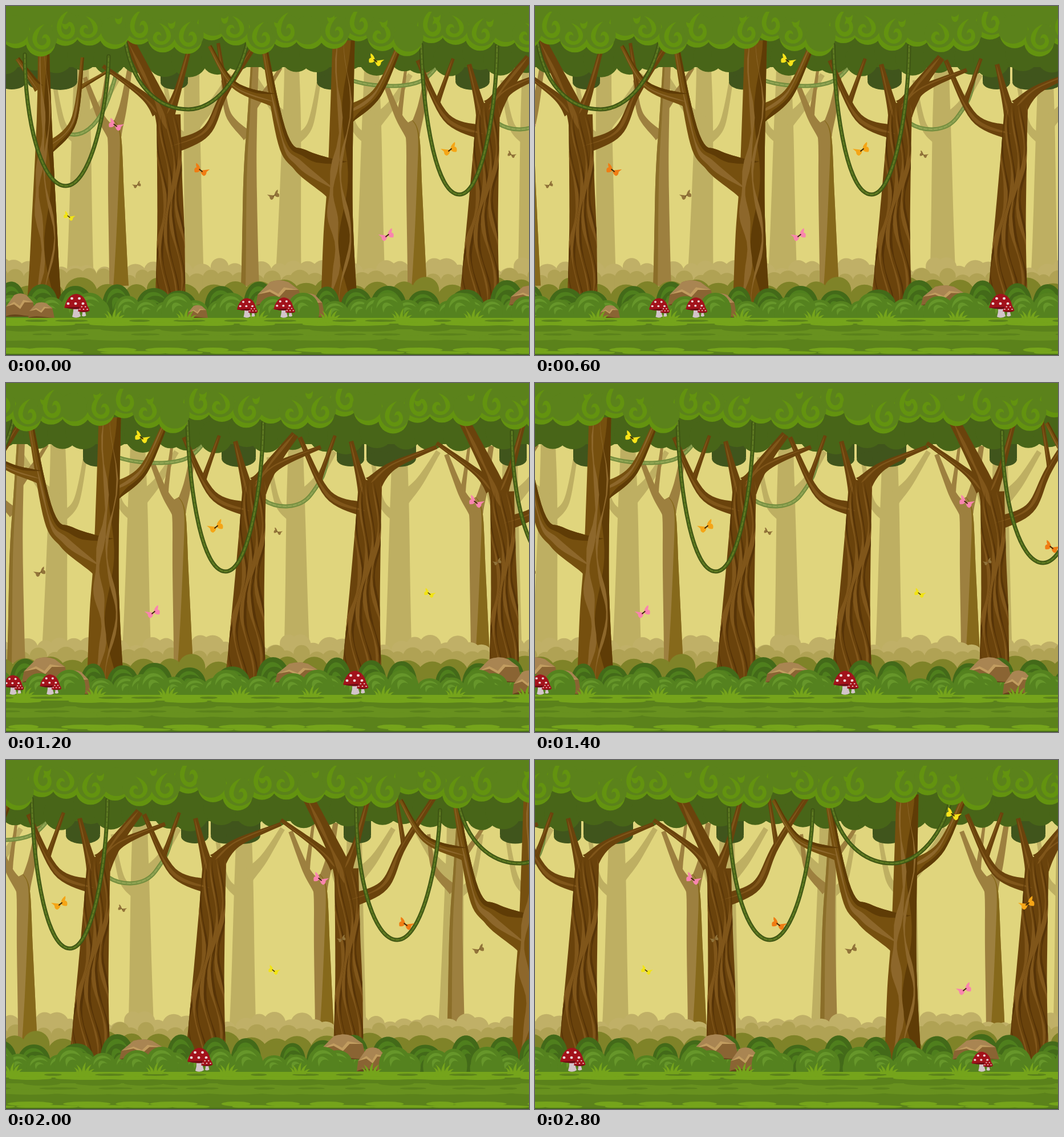
Animation, 917 px wide and 611 px high, one loop 3000 ms. Source, as an HTML page:

```html
<!DOCTYPE html>
<html lang="en">
<head>
<meta charset="utf-8">
<title>Forest walk</title>
<style>
html, body { margin: 0; width: 100%; height: 100%; overflow: hidden; background: #e0d57d; }
svg { display: block; width: 1900px; height: 611px; will-change: transform; }
</style>
</head>
<body>
<svg id="world" viewBox="0 0 1900 611"></svg>
<script>
const WIDTH = 1900;
const world = document.getElementById('world');
let art = '';
let seed = 7;
const rnd = (a, b) => {
  seed = (seed * 16807) % 2147483647;
  return a + (b - a) * seed / 2147483647;
};
const add = s => { art += s; };
const path = (d, fill) => add(`<path d="${d}" fill="${fill}"/>`);
const line = (d, color, w, dash = 'none') =>
  add(`<path d="${d}" fill="none" stroke="${color}" stroke-width="${w}" stroke-linecap="round" stroke-dasharray="${dash}"/>`);
const oval = (x, y, rx, ry, fill) =>
  add(`<ellipse cx="${x}" cy="${y}" rx="${rx}" ry="${ry}" fill="${fill}"/>`);
const rect = (y, h, fill, x = 0, w = WIDTH) => add(`<rect x="${x}" y="${y}" width="${w}" height="${h}" fill="${fill}"/>`);
const at = (x, y, draw, scale = 1) => {
  add(`<g transform="translate(${x} ${y}) scale(${scale})">`);
  draw();
  add('</g>');
};
const copies = (shifts, draw) => shifts.forEach(dx => at(dx, 0, draw));
const scatter = (gap, draw) => {
  for (let x = 0; x < WIDTH; x += gap) draw(x + rnd(-0.2, 0.2) * gap);
};

// A limb reads "startWidth>endWidth x,y x,y ..." and tapers along a smooth spine.
function spine(spec) {
  const [widths, ...knots] = spec.split(' ');
  const [w0, w1] = widths.split('>').map(Number);
  const k = knots.map(p => p.split(',').map(Number));
  const n = (k.length - 1) * 10;
  return Array.from({ length: n + 1 }, (_, s) => {
    const i = Math.min(Math.floor(s / 10), k.length - 2);
    const t = s / 10 - i;
    const [a, b, c, d] = [k[i - 1] || k[i], k[i], k[i + 1], k[i + 2] || k[i + 1]];
    const [x, y] = b.map((_, j) => b[j] + 0.5 * t * (c[j] - a[j] +
      t * (2 * a[j] - 5 * b[j] + 4 * c[j] - d[j] + t * (3 * (b[j] - c[j]) + d[j] - a[j]))));
    return [x, y, w1 + (w0 - w1) * (1 - s / n) ** 1.7];
  });
}
function limb(spec, fill, lo = () => -0.5, hi = () => 0.5) {
  const pts = spine(spec);
  const side = f => pts.map(([x, y, w], i) => {
    const [p, q] = [pts[Math.max(0, i - 1)], pts[Math.min(pts.length - 1, i + 1)]];
    const len = Math.hypot(q[0] - p[0], q[1] - p[1]);
    const o = w * f(y, i / (pts.length - 1)) / len;
    return `${(x - (q[1] - p[1]) * o).toFixed(1)} ${(y + (q[0] - p[0]) * o).toFixed(1)}`;
  });
  path(`M${side(lo).join('L')}L${side(hi).reverse().join('L')}Z`, fill);
}
const clamp = v => Math.max(-0.5, Math.min(0.5, v));
function stripe(spec, color, centre, half, wave, phase) {
  const mid = y => centre + wave * Math.sin(y / 36 + phase);
  const w = (y, t) => half * Math.sin(Math.PI * t) * (0.8 + 0.4 * Math.sin(y / 15 + phase));
  limb(spec, color, (y, t) => clamp(mid(y) - w(y, t)), (y, t) => clamp(mid(y) + w(y, t)));
}
function grainTree([trunk, ...boughs]) {
  [...boughs, trunk].forEach(s => limb(s, '#6a430c'));
  boughs.forEach(s => stripe(s, '#80561a', -0.12, 0.17, 0.05, 1));
  for (let c = -0.4; c < 0.45; c += 0.2) {
    stripe(trunk, '#573407', c + 0.09, 0.05, 0.2, c * 4);
    stripe(trunk, '#80561a', c, 0.06, 0.2, c * 4);
  }
}
function smoothTree([trunk, ...boughs]) {
  [...boughs, trunk].forEach(s => limb(s, '#76500f'));
  boughs.forEach(s => {
    limb(s, '#5f3c06', (y, t) => 0.5 - 0.3 * Math.min(1, t * 4));
    stripe(s, '#8d672b', -0.15, 0.14, 0.1, 2);
  });
  limb(trunk, '#5f3c06', y => 0.16 + 0.16 * Math.sin(y / 38));
  stripe(trunk, '#8d672b', -0.18, 0.16, 0.14, 2);
  stripe(trunk, '#8d672b', 0.2, 0.07, 0.2, 3);
}

const treeA = ['62>20 67,525 67,350 67,200 66,75', '24>6 70,252 118,203 134,90', '8>5 131,142 182,112', '18>8 58,145 20,92'];
const treeB = ['54>42 288,525 289,400 287,300 285,190', '42>19 285,215 265,160 212,55', '26>7 267,185 240,156 170,105',
  '24>7 285,190 302,145 328,50', '26>9 287,248 350,220 385,150 450,48', '10>6 386,152 372,65'];
const treeC = ['66>39 584,525 583,400 586,290 592,60', '34>10 598,190 650,153 694,60',
  '74>10 582,305 520,272 484,228 448,45', '24>7 470,165 400,138 357,70'];
const treeD = ['74>41 830,525 834,410 841,270 846,170', '28>8 838,222 772,195 722,95', '10>6 757,167 784,92',
  '24>8 836,195 812,102', '34>7 850,178 885,145 962,112'];
const thickBough = '38>14 850,185 880,138 917,90';

const midLean = ['34>22 198,490 193,330 190,230 180,205', '24>8 188,225 165,192 138,125', '24>9 191,225 205,178 217,110', '10>5 167,190 178,110'];
const midStraight = ['32>14 428,490 428,300 432,190 436,105', '20>6 424,228 390,190 380,130', '14>6 432,180 458,145 482,108'];
const midTrees = () => {
  [0, 523].forEach(dx => at(dx, 0, () => {
    midLean.forEach(s => limb(s, '#9d803f'));
    limb(midLean[0], '#86691b', y => clamp(0.5 - (y - 190) / 380));
  }));
  midStraight.forEach(s => limb(s, '#9d803f'));
  limb(midStraight[0], '#8b6e29', undefined, () => -0.25);
};
function paleTree(x, base, lean, side) {
  const top = x + lean;
  const tone = '#beaf62';
  limb(`${base}>26 ${x},480 ${top},210 ${top},105`, tone);
  limb(`28>9 ${top + side * 4},205 ${top + side * 34},174 ${top + side * 68},120`, tone);
  limb(`20>7 ${top - side * 6},235 ${top - side * 32},208 ${top - side * 48},130`, tone);
}

function hedge(step, top, spread, r, fill) {
  for (let x = -10; x < WIDTH; x += step * rnd(0.75, 1.25)) {
    const y = top + rnd(0, spread);
    const w = r * rnd(0.8, 1.25);
    path(`M${x - w} 555V${y + w}A${w} ${w} 0 0 1 ${x + w} ${y + w}V555Z`, fill);
  }
}
function bush(x, top, w, [fill, glow]) {
  const h = 552 - top;
  at(x, top, () => {
    path('M-1 1C-1.4.4-.8 0 0 0S1.4.4 1 1Z', fill);
    path('M-.8.55C-.8.1.2-.05.7.35C.2.15-.45.2-.8.55Z', glow);
    path('M-.3.7C-.6.3 0 .25.4.5C.1.4-.2.45-.3.7Z', glow);
  }, `${w} ${h}`);
}
const DEEP = ['#436a19', '#4f7f1d'];
const LEAFY = ['#55821f', '#66962a'];
function rock(x, bottom, w, h) {
  at(x, bottom, () => {
    path('M-.5 0L-.46-.42-.28-.62-.2-.9Q0-1.04.2-.9L.42-.6.5 0Z', '#8a6433');
    path('M-.46-.42L-.2-.9Q0-1.04.2-.9L.42-.6.1-.68-.02-.45-.2-.6Z', '#a98552');
    path('M-.46-.42L-.2-.62-.02-.45.1-.7.42-.6.14-.6 0-.32-.2-.52Z', '#c29d60');
    path('M-.5 0Q-.3-.14 0-.08T.5 0Z', '#65451b');
  }, `${w} ${h}`);
}
function cap(x, y, s) {
  at(x, y, () => {
    path('M-4-3Q-3 10-6 19Q2 23 9 18Q5 8 6-3Z', '#d3c4ca');
    path('M-20 3Q-14-21 2-21Q17-19 21 1Q8 9-20 3Z', '#a3121b');
    path('M-20 3Q0 2 21 1Q8 9-20 3Z', '#6d0c14');
    for (let i = -2; i < 3; i++) oval(i * 6.5, i % 2 ? -13 : -4, 2.5, 2.2, '#ecd9da');
  }, s);
}
function mushrooms(x, s) {
  at(x, 546, () => {
    cap(-2, -21, 1);
    cap(12, -13, 0.5);
  }, s);
}
const BROWN = '#92743a';
function butterfly(x, y, color, s, flip) {
  at(x, y, () => {
    path('M2 1L-15-1Q-11 2-9 4Q-9 10-4 11Q1 9 2 1Z', color);
    path('M2 1Q3-9 10-13Q11-8 9-5Q15-4 13 4Q8 6 2 1Z', color);
    line('M-1 3L4-1', color === BROWN ? '#77592a' : '#3a2606', 2);
  }, `${flip ? -s : s} ${s}`);
}
function vine(d, tones) {
  line(d, tones[0], 7);
  line(d, tones[1], 4);
  line(d, tones[2], 2, '5 4');
}

// Far distance
rect(0, 611, '#e0d57d');
copies([0, 968], () => {
  paleTree(130, 48, 2, 1);
  paleTree(330, 34, -4, 1);
  paleTree(495, 46, 6, -1);
  paleTree(639, 52, 2, 1);
  paleTree(920, 46, -2, 1);
});
copies([1044], midTrees);
hedge(26, 440, 20, 17, '#c0b067');
hedge(24, 457, 14, 15, '#b0a254');
copies([0], midTrees);
const backTones = ['#6f8a3b', '#83994a', '#93a755'];
vine('M545 85C570 125 620 140 675 140S740 125 757 105', backTones);
vine('M105 222C135 235 160 205 172 180S190 130 195 112', backTones);
vine('M862 205C885 220 925 222 945 195S970 160 975 122', backTones);
hedge(44, 472, 18, 25, '#7f8328');

// Shaded leaves behind the trees
copies([0, 1004], () => [10, 65, 95, 295, 572, 818].forEach((x, i) => {
  const r = 24 + i % 3 * 3;
  rect(80, 60 - r / 3, '#40551c', x - r, 2 * r);
  oval(x, 142 - r / 3, r, r / 2, '#40551c');
}));
rect(0, 107, '#486518');
scatter(46, x => {
  const r = rnd(25, 33);
  oval(x, rnd(112, 125) - r, r, r, '#486518');
});

// Main trees and hanging vines
smoothTree(treeA);
copies([0, 995], () => grainTree(treeB));
copies([0, 1018], () => smoothTree(treeC));
copies([203], () => grainTree(treeD));
copies([0, 992], () => grainTree([...treeD, thickBough]));
const vineTones = ['#3c5212', '#4f6a1a', '#627d24'];
copies([0, 1264], () => {
  vine('M33 85C33 200 62 315 105 315S178 180 180 88', vineTones);
  vine('M210 65C225 150 275 181 320 181S410 130 424 60', vineTones);
});
vine('M728 68C732 200 755 330 795 330S860 180 861 70', vineTones);

// Sunlit canopy: scalloped lobes with a lit lower rim and curls
const LIT = '#63930f';
const LEAF = '#5b821b';
const curl = 'M10-50C-24-40-32-8-8 6C14 16 34-2 23-20C17-31 3-28 4-15C10-24 20-14 14-6C4 6-15-4-9-21C-6-33 0-42 10-50Z';
const lobes = Array.from({ length: 24 }, (_, i) => ({
  x: 18 + i * 42.8,
  y: 74 + 9 * Math.sin(i * 2.1) + 7 * Math.sin(i * 1.3),
  flip: i % 3 ? 1 : -1
}));
rect(0, 52, LEAF);
copies([0, 1028], () => {
  lobes.forEach(({ x, y }) => oval(x, y - 25, 26, 25, LIT));
  lobes.forEach(({ x, y, flip }) => oval(x + flip * 3, y - 33, 26, 25, LEAF));
  lobes.forEach(({ x, y, flip }, i) => i % 4 && at(x, y - 19, () => path(curl, LIT), `${flip * 0.66} ${0.65 + i % 3 * 0.1}`));
  for (let x = 98; x < 1028; x += 93) path(`M${x} ${17 + x % 17}q7 5 13-3q0 14-7 14q-6-2-6-11Z`, LIT);
});
rect(0, 10, LEAF);

// Undergrowth
rect(530, 25, DEEP[0]);
scatter(62, x => bush(x, rnd(479, 499), rnd(20, 29), DEEP));
scatter(41, x => bush(x, rnd(505, 519), 21, LEAFY));
[479, 923, 1274, 1730].forEach((x, i) => {
  rock(x, 524, 82, i % 2 ? 36 : 45);
  if (i % 2 === 0) rock(x + 52, 545, 56, 43);
  bush(x - 10, 508, 24, LEAFY);
});
scatter(137, x => bush(x, 502, 25, LEAFY));
rock(25, 544, 54, 42);
rock(62, 546, 46, 28);
rock(336, 546, 36, 23);

// Ground
const GRASS = '#75a41b';
rect(549, 62, LEAF);
rect(546, 10, GRASS);
rect(566, 15, '#68911f');
scatter(90, x => {
  oval(x, 557, rnd(30, 60), 3, GRASS);
  oval(x + 40, 551, rnd(14, 30), 2, LEAF);
  oval(x + 20, 566, rnd(30, 60), 4, LEAF);
  oval(x, 581, rnd(45, 80), 5, '#68911f');
  oval(x + 50, 575, rnd(15, 35), 2, LEAF);
  oval(x, 602, rnd(25, 48), 4, GRASS);
  oval(x + 30, 607, rnd(30, 60), 3, GRASS);
});
rect(609, 2, '#466a1a');
for (let x = 190; x < WIDTH; x += 126) {
  path(`M${x - 14} 550q2-7-4-12q8 3 9 9q-1-9-5-14q9 6 10 13q1-10 7-17q-2 10-1 16q4-9 11-12q-5 7-5 12q5-4 10-4q-6 4-7 9Z`, GRASS);
}
mushrooms(124, 1);
mushrooms(423, 0.82);
mushrooms(488, 0.85);
mushrooms(1023, 1);
mushrooms(1741, 0.84);

copies([0, 1042], () => {
  butterfly(649, 95, '#f8e319', 0.95, true);
  butterfly(193, 208, '#f985ae', 0.95, true);
  butterfly(343, 287, '#f07c13', 0.95, true);
  butterfly(111, 368, '#f2e414', 0.72, true);
  butterfly(667, 401, '#f985ae', 0.95);
  butterfly(777, 251, '#f5a516', 1);
  butterfly(229, 313, BROWN, 0.55);
  butterfly(469, 331, BROWN, 0.75);
  butterfly(887, 260, BROWN, 0.55, true);
});

world.innerHTML = art;

// Fifteen hard steps to the left, then a cut back to the start.
const STEPS = 15;
const frames = Array.from({ length: STEPS + 1 }, (_, i) => ({
  offset: i / STEPS,
  transform: `translateX(${-Math.round(Math.min(i, STEPS - 1) * 68.33)}px)`,
  easing: 'steps(1, end)'
}));
world.animate(frames, { duration: 3000, iterations: Infinity });
</script>
</body>
</html>
```
